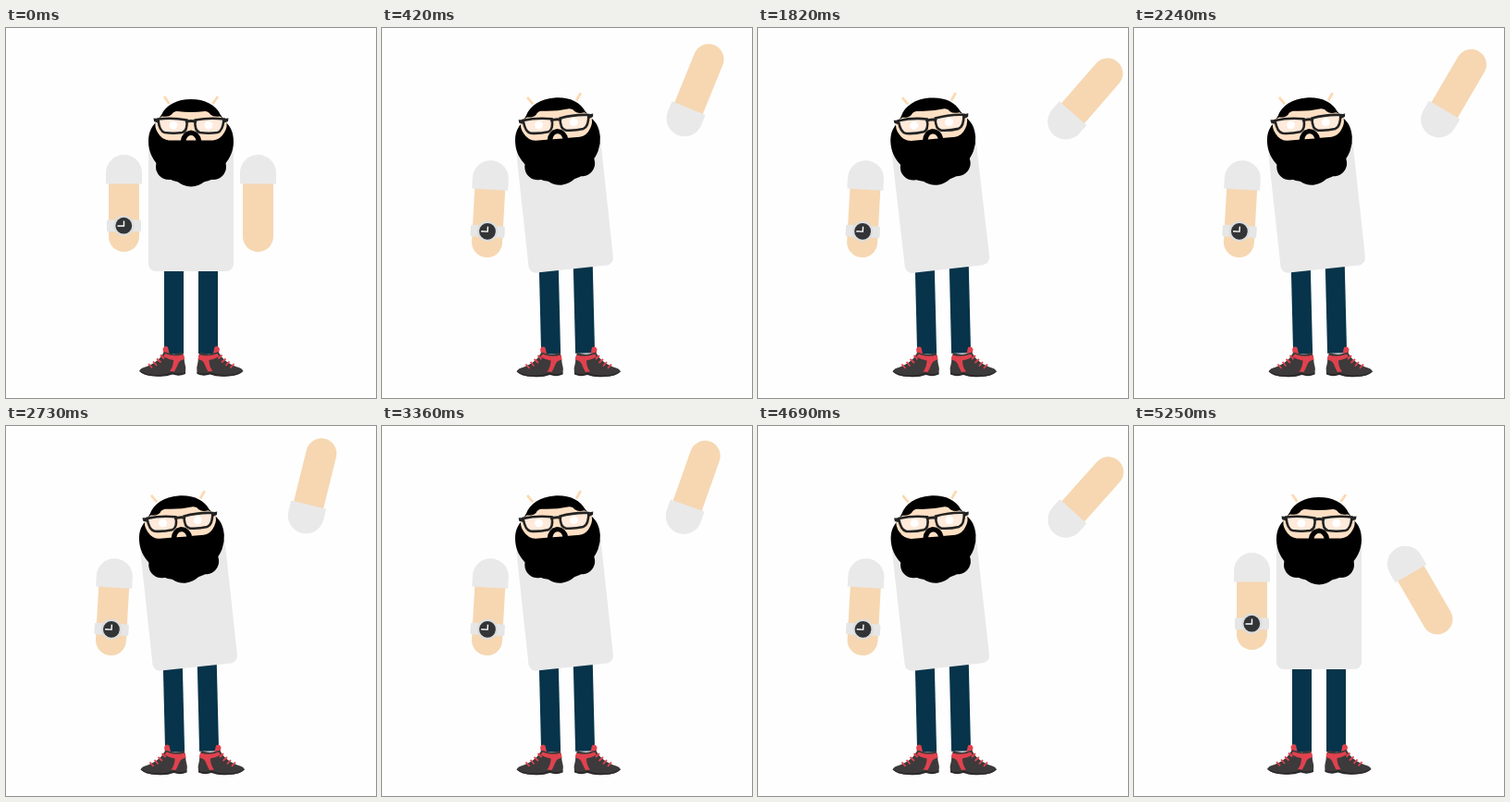
Animation, 400 px wide and 400 px high, one loop 5.32 s. Source, as an HTML page:

```html
<!DOCTYPE html>
<html>
<head>
<meta charset="utf-8">
<style>
html, body { margin: 0; width: 100%; height: 100%; overflow: hidden; background: #fefefe; }
svg { display: block; width: 100%; height: 100%; }
</style>
</head>
<body>
<svg viewBox="0 0 400 400">
  <defs>
    <g id="limb">
      <rect x="256" y="150" width="33" height="92" rx="16.5" fill="#f6d7b2"/>
      <path d="M253 168.500V156.500a19.500 19.500 0 0 1 39 0V168.500Z" fill="#e9e9e9"/>
    </g>
    <g id="shoe">
      <path d="M171 355L169.500 347Q171 342.500 175 345L177 354Z" fill="#e0424e"/>
      <path d="M144 371Q145 367.500 152 366Q162 362 167 356L171 350Q180 354 191 350.500Q193 355 193 361Q195 367 194 373Q187 377 180 373.500Q172 377 162 376.500Q149 376 144 371Z" fill="#3d3a3b"/>
      <path d="M172 352Q182 356 192 353L193 358Q188 359 186.500 362Q184 368 182 371.500L177 371Q181 366 181 359Q175 358 170 355Z" fill="#e0424e"/>
      <path d="M154 363l4 4.500M159 360.500l4 4.500M163 357.500l4.500 4M167 353.500l4 4" stroke="#e0424e" stroke-width="1.800"/>
      <path d="M144 370.500Q152 375 163 375Q173 375 180 372Q187 375 194 372V374Q187 377 180 374.500Q172 377.500 162 376.500Q148 376 144 370.500Z" fill="#2b292a"/>
    </g>
  </defs>

  <g id="legs" fill="#07344a">
    <rect x="171" y="250" width="21" height="102"/>
    <rect x="208" y="250" width="21" height="102"/>
  </g>
  <g id="shoes">
    <use href="#shoe"/>
    <use href="#shoe" transform="translate(400.5) scale(-1 1)"/>
  </g>

  <g id="leftArm">
    <use href="#limb" x="-145"/>
    <rect x="109" y="207.500" width="37" height="12.500" rx="1.500" fill="#e6e6e6"/>
    <circle cx="127.300" cy="213.700" r="11" fill="#dcdddd"/>
    <circle cx="127.300" cy="213.700" r="8.900" fill="#333436"/>
    <path d="M127.500 208.500V214H120.500" fill="none" stroke="#fff" stroke-width="1.400"/>
  </g>
  <g id="rightArm"><use href="#limb"/></g>

  <g id="body">
    <rect x="154" y="125" width="92" height="138" rx="8" fill="#e9e9e9"/>
    <g id="head">
      <path d="M171 74L176.500 82M229 74L223.500 82" stroke="#fbdab3" stroke-width="2.800"/>
      <path d="M154 123C154 113 157 107 162 102L168 94C173 83 185 77 200 77S227 83 232 94L238 102C243 107 246 113 246 123A46 40 0 0 1 154 123Z"/>
      <ellipse cx="200" cy="148" rx="36" ry="20"/>
      <circle cx="176" cy="150" r="14"/>
      <circle cx="224" cy="150" r="14"/>
      <circle cx="200" cy="149.500" r="22"/>
      <path d="M162 99L169 95.500Q176 96.500 179 93.500Q181 90 185 90Q200 92 215 90Q219 90 221 93.500Q224 96.500 231 95.500L238 99Q240 107 236 113Q232 120.500 224 121.500H176Q168 120.500 164 113Q160 107 162 99Z" fill="#ffe0c4"/>
      <g id="lens">
        <path d="M164.500 98.500Q180 96.500 195.500 99.500Q196.500 111.500 190.500 113Q181 114.500 171.500 113Q165.500 111.500 164.500 98.500Z" fill="#ffeadb" stroke="#222" stroke-width="2.600"/>
        <circle cx="181" cy="105" r="4.500" fill="#fff"/>
        <path d="M159.500 97.500L165 98L165.500 103L160 101Z" fill="#222"/>
      </g>
      <use href="#lens" transform="translate(400) scale(-1 1)"/>
      <path d="M194 101.500Q200 99.500 206 101.500" fill="none" stroke="#222" stroke-width="3"/>
      <path d="M188.500 123Q190 111.500 200 110.500Q210 111.500 211.500 123Z"/>
      <path d="M194.500 121.500Q196 116 200 116T205.500 121.500Z" fill="#ffe0c4"/>
    </g>
  </g>
</svg>
<script>
const LOOP = 5320, STEP = 70, WAVE = LOOP / 9, FALL = 5015;
const MID = 26.3, SWING = 16.8;
const part = id => document.getElementById(id);
const clamp = x => Math.min(1, Math.max(0, x));
const smooth = p => (1 - Math.cos(Math.PI * p)) / 2;
const pose = (id, x, y, angle, cx, cy) =>
  part(id).setAttribute('transform', `translate(${x} ${y}) rotate(${angle} ${cx} ${cy})`);

function draw(t) {
  const up = clamp(t / (WAVE / 2));
  const down = clamp((t - FALL) / (LOOP - FALL));
  const phase = 2 * Math.PI * t / WAVE;

  // Raised arm swings around MID degrees off vertical, starting and ending nearest to it.
  const waving = up === 1 && down === 0;
  const swing = MID + SWING * (waving ? Math.cos(phase) : -1);
  const lift = up < 1 ? 1 - (1 - up) ** 1.7 : 1 - (smooth(down) + down) / 2;
  const shift = Math.min(up, 1 - down);
  pose('rightArm', 47 * shift, -20.3 * shift, (swing - 180) * lift, 272.5, 136.5);

  // The body leans away, with a slight sway while waving.
  const lean = (1 - (1 - up) ** 2) * (1 - smooth(clamp((t - 5000) / 230)));
  const sway = 0.5 * Math.sin(phase - 2.8);
  pose('body', 0, -2.2 * lean, (-6.4 + sway * 0.5) * lean, 200, 216);
  pose('head', 0, 0, 1.4 * lean, 200, 122);
  pose('leftArm', (-10.6 + sway) * lean, 6.2 * lean, 3.2 * lean, 127.5, 156);
  pose('legs', 1.3 * lean, 0, -1.4 * lean, 200, 360);
  pose('shoes', 1.5 * lean, 0.5 * lean, 0, 0, 0);
}

const start = performance.now();
function tick() {
  const t = (performance.now() - start) % LOOP;
  draw(Math.floor(t / STEP) * STEP);
  requestAnimationFrame(tick);
}
tick();
</script>
</body>
</html>
```
